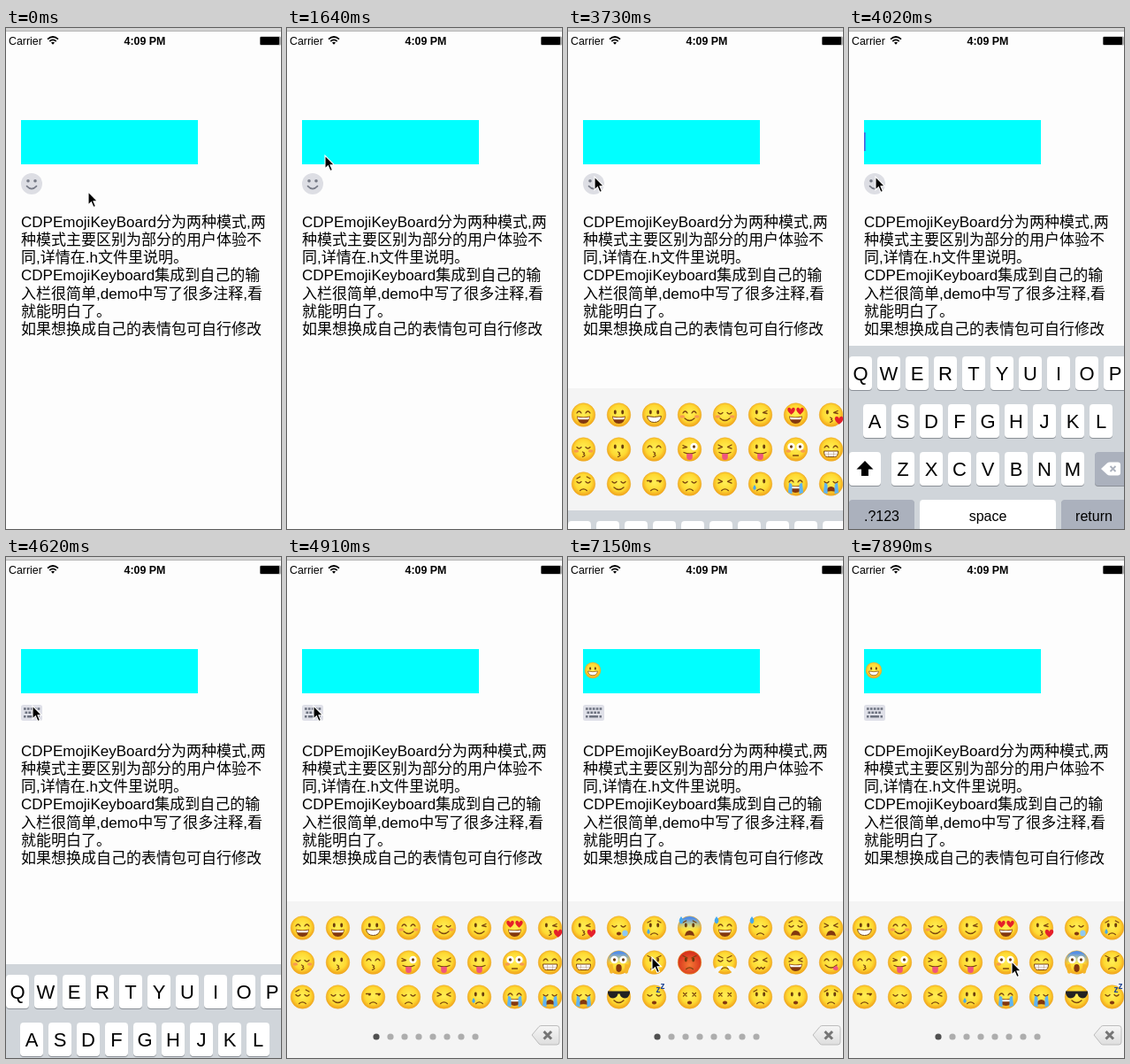
Write an HTML page that moves like this. It is 311x566 px and loops after 8 s.

```html
<!DOCTYPE html>
<html lang="zh-CN">
<head>
<meta charset="utf-8">
<title>Emoji keyboard</title>
<style>
html, body { margin: 0; width: 100%; height: 100%; overflow: hidden; background: #fdfdfd; }
svg { display: block; width: 311px; height: 566px; }
text { font-family: "Liberation Sans", Arial, "Noto Sans CJK SC", "Noto Sans CJK", sans-serif; }
.bar { font-size: 12.4px; }
.note { font-size: 17px; font-weight: 300; }
.key { font-size: 22px; text-anchor: middle; }
.word { font-size: 16px; text-anchor: middle; }
.ink { fill: none; stroke: #7a450f; stroke-width: 1.3; stroke-linecap: round; stroke-linejoin: round; }
</style>
</head>
<body>
<svg id="stage" viewBox="0 0 311 566">
  <defs>
    <radialGradient id="yellow" cy=".45"><stop offset="0" stop-color="#ffef55"/><stop offset=".7" stop-color="#fed932"/><stop offset="1" stop-color="#f4ad20"/></radialGradient>
    <radialGradient id="red" cy=".6"><stop offset="0" stop-color="#f47a35"/><stop offset="1" stop-color="#d8351d"/></radialGradient>
    <radialGradient id="purple" cy=".4"><stop offset="0" stop-color="#d9a3ee"/><stop offset="1" stop-color="#8f4fb8"/></radialGradient>
    <linearGradient id="chill" x2="0" y2="1"><stop offset=".1" stop-color="#5590e6"/><stop offset=".55" stop-color="#8dbdf0" stop-opacity="0"/></linearGradient>
    <linearGradient id="tab" x2="0" y2="1"><stop offset="0" stop-color="#f6f6f6"/><stop offset="1" stop-color="#dedede"/></linearGradient>
  </defs>

  <rect width="311" height="566" fill="#fdfdfd"/>
  <rect width="311" height="3" fill="#d4d4d4"/>
  <rect y="3" width="311" height="1" fill="#b4b4b4"/>
  <text class="bar" x="3" y="18.5">Carrier</text>
  <g fill="none" stroke="#000" stroke-width="1.7">
    <path d="M47 12.600Q53 7.400 59 12.600M49.300 15Q53 11.800 56.700 15"/>
    <path d="M51 16.600Q53 15 55 16.600L53 18.700Z" fill="#000" stroke="none"/>
  </g>
  <text class="bar" x="157" y="18.5" text-anchor="middle" font-weight="bold">4:09 PM</text>
  <rect x="287" y="9.500" width="24" height="10" rx="1.5" fill="#aaa"/>
  <rect x="287.500" y="10" width="21.500" height="9" rx="1"/>

  <rect x="17" y="104" width="200" height="50" fill="#0ff"/>
  <rect id="caret" x="17" y="118" width="1.6" height="21" fill="#4a5fe0"/>
  <g id="typed" transform="translate(28 128) scale(.68)"></g>

  <g id="smiley">
    <circle cx="29" cy="176" r="12" fill="#dddee4"/>
    <g fill="#777b87"><circle cx="25" cy="172.800" r="1.8"/><circle cx="33" cy="172.800" r="1.8"/></g>
    <path d="M23.500 178.600Q29 184.600 34.500 178.600" fill="none" stroke="#777b87" stroke-width="1.6" stroke-linecap="round"/>
  </g>
  <g id="keyIcon">
    <rect x="17" y="167" width="24" height="18" rx="2.5" fill="#dfe0e8"/>
    <g stroke="#6d7280" stroke-width="2.5">
      <path d="M20 171.500H38.500M21.500 175.800H37" stroke-dasharray="2.700 1.200"/>
      <path d="M20 180.200H22.500M24 180.200H34M35.500 180.200H38"/>
    </g>
  </g>
  <g id="note"></g>

  <g id="emojiPad">
    <rect width="311" height="177" fill="#f4f4f4"/>
    <g id="faces"></g>
    <g id="dots"></g>
    <path d="M277 151L285 141.500Q286 140.500 288 140.500H305Q308 140.500 308 143.500V159Q308 162 305 162H288Q286 162 285 161Z" fill="url(#tab)" stroke="#bdbdbd"/>
    <path d="M290.500 147L299 155.500M299 147L290.500 155.500" stroke="#757575" stroke-width="3"/>
  </g>
  <g id="letterPad"></g>

  <path id="cursor" d="M0 0V15L3.400 11.800L5.900 17.500L8.400 16.400L6 10.800H10.600Z" fill="#000" stroke="#fff" stroke-width="1.1"/>
</svg>
<script>
const $ = id => document.getElementById(id);

// ---- faces: eyes, mouth, then any extras, one letter each ----
const BROWN = '#6b3d0c', MAROON = '#83380f', PINK = '#f0567c';
const both = s => s + `<g transform="scale(-1 1)">${s}</g>`;
const left = s => `<g transform="scale(-1 1)">${s}</g>`;
const ink = d => `<path class="ink" d="${d}"/>`;
const fill = (d, c) => `<path d="${d}" fill="${c}"/>`;
const oval = (x, y, rx, ry, c) => `<ellipse cx="${x}" cy="${y}" rx="${rx}" ry="${ry}" fill="${c}"/>`;
const heart = (x, y, k) => `<g transform="translate(${x} ${y}) scale(${k})">` +
  fill('M0 3C-5-.5-3.5-3.5-1.6-3.3Q0-3 0-1.5Q0-3 1.6-3.3C3.5-3.5 5-.5 0 3Z', '#e5202a') + '</g>';
const drop = (x, y, k = 1) => `<g transform="translate(${x} ${y}) scale(${k})">` +
  fill('M0 0q-3.5 4.500 0 6q3.500-1.500 0-6Z', '#45a8ef') + '</g>';

const dot = oval(4.2, -3, 1.5, 2.4, BROWN);
const stare = oval(5, -3, 4.2, 4.2, '#fff') + oval(5, -3, 1.6, 1.8, BROWN);

const EYES = {
  d: both(dot),
  h: both(ink('M-7.500-2q2.500-4 5 0')),
  c: both(ink('M-7.500-2.500q2.500 3 5 0')),
  g: both(ink('M-7.500-5L-3-2.700L-7.500-.8')),
  w: left(dot) + ink('M7.500-4.500L3-2.500L7.500-1.500'),
  W: left(ink('M7.500-4.500L3-2.500L7.500-1.500')) + stare,
  H: both(heart(5, -4, 1.25)),
  o: both(stare),
  x: both(ink('M-7-4.500l3.600 3.600m0-3.600l-3.600 3.600')),
  l: ink('M-8-3.500h5M3-3.500h5') + oval(-4.2, -2.600, 1.3, 1.2, BROWN) + oval(6.5, -2.600, 1.3, 1.2, BROWN),
  s: fill('M-12.500-6.500H12.500V-4Q11 1.500 6.500 1.500Q2 1 1-3.500H-1Q-2 1-6.500 1.500Q-11 1.500-12.500-4Z', '#222')
};

const MOUTHS = {
  s: ink('M-5.500 4Q0 9 5.500 4'),
  S: fill('M-7.500 1.500Q0 3.500 7.500 1.500Q6.500 10 0 10Q-6.500 10-7.500 1.500Z', MAROON) +
    fill('M-6.700 2.400Q0 4.200 6.700 2.400L5.800 5.200H-5.800Z', '#fff'),
  e: '<path d="M-8 1.500Q0 3.500 8 1.500Q7 8.500 0 8.500Q-7 8.500-8 1.500Z" fill="#fff" stroke="#7a450f"/>',
  g: '<path d="M-8 2H8Q8 8.500 4 8.500H-4Q-8 8.500-8 2Z" fill="#fff" stroke="#7a450f"/>' +
    '<path d="M-7 5.300H7M-3 2.500V8M3 2.500V8" stroke="#b99a80" stroke-width=".6"/>',
  k: ink('M-1 3q3.500 1 1 2.500q3.500 1.300-1 2.800'),
  t: ink('M-6.500 3.500Q0 6.500 6.500 3.500') + fill('M-3.300 5H3.300V9Q3 12 0 12Q-3 12-3.300 9Z', PINK),
  y: ink('M-6.500 3Q0 9 6.500 3') + fill('M1.500 6.500L6 3.500Q10 7 6.500 9Q3.500 9.500 1.500 6.500Z', PINK),
  f: ink('M-3.800 7.500Q0 4.300 3.800 7.500'),
  F: fill('M-5.500 9Q-4.500 3 0 3Q4.500 3 5.500 9Q0 7.500-5.500 9Z', MAROON),
  n: ink('M-3 7H3'),
  z: ink('M-5 7.500l2-2 2 2 2-2 2 2 2-2'),
  o: oval(0, 6.5, 2.6, 2.1, MAROON),
  O: oval(0, 6.5, 3.2, 4.4, MAROON),
  m: fill('M-12.500 1Q0-2 12.500 1L9 9Q0 14-9 9Z', '#f5f8fb')
};

const EXTRAS = {
  b: both(oval(8.2, 2, 2.8, 1.8, '#f79a50')),
  h: heart(9, 6.5, 1.4),
  t: drop(-6.5, 1),
  T: both(fill('M-7.500-1Q-4-1-4 2V11.500L-8.500 10Z', '#5fb4f2')),
  w: drop(-9.5, -13, 1.4),
  i: both(ink('M-7.500-6L-3.800-8')),
  v: both(ink('M-7.500-7.500L-2.500-5')),
  q: both(fill('M2 4Q8 3.500 11 6.500Q13.500 11 9 12Q6 10 2 4Z', '#f4f7fa')),
  n: oval(7, 6, 3.2, 3.5, '#8cc8f4'),
  u: both(fill('M-12 5Q-10 1-7 2L-6 10Q-7 14-10 12Z', '#f5b62a')),
  Z: '<text x="2" y="-5" font-size="10" font-weight="bold" fill="#1f4596">z<tspan dy="-4">z</tspan></text>'
};

function face([eye, mouth, ...extras]) {
  const has = c => extras.includes(c);
  const skin = has('r') ? 'red' : has('p') ? 'purple' : 'yellow';
  const horns = has('p') ? both(fill('M-11-5L-11-14L-4-11Z', '#8f4fb8')) : '';
  const chill = has('a') ? '<circle r="13" fill="url(#chill)"/>' : '';
  return `${horns}<circle r="13.300" fill="url(#${skin})" stroke="#e9a928" stroke-width=".5"/>${chill}` +
    EYES[eye] + MOUTHS[mouth] + extras.map(c => EXTRAS[c] || '').join('');
}

const ROWS = [
  'hS dS de hsb csb ws HS wkh con dfit dFaiw hSw cfw cFi gF dFai',
  'ckb dk hk Wt gt dt onb hg oOau dfv dfvr cfvq gz gS hy cm',
  'cfi cs lf cf gf dft hST cFT ss coZ xo xo dfi do dfi dsvp'
].map(r => r.split(' '));

$('faces').innerHTML = ROWS.map((row, r) => row.map((code, c) =>
  `<g transform="translate(${17.5 + 40 * c} ${30 + 39 * r})">${face(code)}</g>`).join('')).join('');
$('typed').innerHTML = face('de');
$('dots').innerHTML = Array.from({ length: 8 }, (_, i) => `<circle cx="${101 + 16 * i}" cy="153" r="3.600"/>`).join('');

$('note').innerHTML = [
  'CDPEmojiKeyBoard分为两种模式,两', '种模式主要区别为部分的用户体验不', '同,详情在.h文件里说明。',
  'CDPEmojiKeyboard集成到自己的输', '入栏很简单,demo中写了很多注释,看', '就能明白了。', '如果想换成自己的表情包可自行修改'
].map((s, i) => `<text class="note" x="17" y="${224.5 + 20.3 * i}">${s}</text>`).join('');

// ---- letter keyboard ----
function key(x, y, w, label = '', tone = '#fff', style = 'key') {
  const box = (dy, c) => `<rect x="${x}" y="${y + dy}" width="${w}" height="38" rx="4" fill="${c}"/>`;
  return box(1, '#8b9097') + box(0, tone) +
    `<text class="${style}" x="${x + w / 2}" y="${y + (style === 'key' ? 27 : 24)}">${label}</text>`;
}
const GREY = '#abb1bd';
$('letterPad').innerHTML = '<rect width="311" height="207" fill="#d0d5da"/>' +
  [['QWERTYUIOP', 0], ['ASDFGHJKL', 16], ['ZXCVBNM', 48]].map(([s, x], r) =>
    [...s].map((ch, i) => key(x + 32 * i, 12 + 54 * r, 26, ch)).join('')).join('') +
  key(0, 120, 36) + key(278, 120, 36, '', GREY) +
  fill('M18 130L27.500 139.500H22V147H14V139.500H8.500Z', '#000') +
  fill('M285 139L292 132.500Q293 131.500 295 131.500H304Q307 131.500 307 134.500V143.500Q307 146.500 304 146.500H295Q293 146.500 292 145.500Z', '#fff') +
  `<path d="M295.500 136l6 6m0-6l-6 6" stroke="${GREY}" stroke-width="1.8"/>` +
  key(0, 174, 74, '.?123', GREY, 'word') + key(80, 174, 154, 'space', '#fff', 'word') +
  key(240, 174, 74, 'return', GREY, 'word');

const LOOP = 8000, BEAT = 148.75;
const POINTER = [[5, 93, 185], [11, 43, 144], [18, 43, 144], [21, 30, 168], [34, 30, 168], [35, 98, 362], [36, 98, 362],
  [38, 104, 398], [40, 102, 408], [43, 102, 408], [45, 205, 450], [48, 95, 452], [51, 95, 452], [53, 184, 457]];
const PAD = [[20, 0], [21, .1], [22, .56], [23, .93], [24, 1], [25, .9], [26, .12], [27, 0],
  [30, 0], [31, .49], [32, .93], [33, 1]];
const SCROLL = [[45, 0], [47, 73], [48, 280], [49, 312], [50, 320], [51, 320], [52, 270], [53, 80]];

function at(keys, n) {
  const i = keys.findIndex(k => k[0] > n);
  if (i === 0) return keys[0].slice(1);
  if (i < 0) return keys[keys.length - 1].slice(1);
  const a = keys[i - 1], b = keys[i], f = (n - a[0]) / (b[0] - a[0]);
  return a.slice(1).map((v, j) => v + (b[j + 1] - v) * f);
}
const move = (id, x, y) => $(id).setAttribute('transform', `translate(${Math.round(x)} ${Math.round(y)})`);
const show = (id, on) => $(id).setAttribute('visibility', on ? 'visible' : 'hidden');

function render(ms) {
  const n = Math.max(0, Math.floor((ms - 1) / BEAT));
  const [up] = at(PAD, n), [scroll] = at(SCROLL, n);
  const emojiMode = (n >= 21 && n < 25) || n >= 31;
  move('cursor', ...at(POINTER, n));
  move('emojiPad', 0, 566 - 177 * up);
  move('letterPad', 0, 566 - 207 * (n < 24 ? 0 : 1 - up));
  move('faces', -scroll, 0);
  show('keyIcon', emojiMode);
  show('smiley', !emojiMode);
  show('caret', n >= 26 && n < 29);
  show('typed', n >= 41);
  const page = Math.floor(scroll / 320);
  [...$('dots').children].forEach((d, i) => d.setAttribute('fill', i === page ? '#505050' : '#adadad'));
}

function tick() {
  render(performance.now() % LOOP);
  requestAnimationFrame(tick);
}
tick();
</script>
</body>
</html>
```
